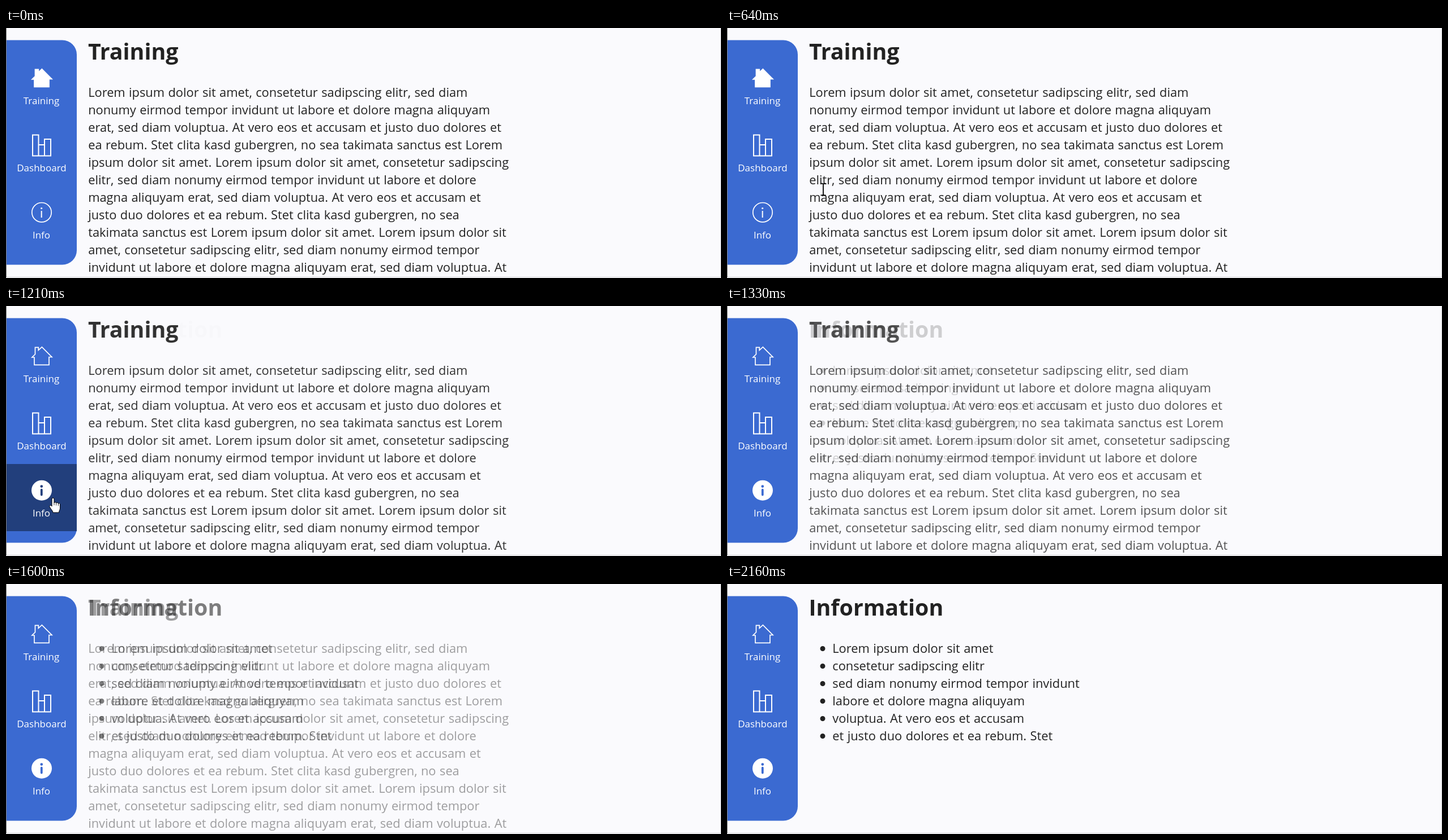
An HTML page for the animation above (2420 ms loop, 1263 by 443 pixels).

```html
<!DOCTYPE html>
<html lang="en">
<head>
<meta charset="utf-8">
<title>Sidebar navigation</title>
<style>
  html, body { margin: 0; width: 100%; height: 100%; overflow: hidden; background: #fafafd; }
  svg { display: block; width: 100%; height: 100%; }
  text { font-family: "Open Sans", "Noto Sans", sans-serif; font-kerning: normal; }
  .page { fill: #222; font-size: 21.8px; word-spacing: .8px; }
  .page .title { font-size: 39.3px; font-weight: 700; }
  .label { fill: #fff; font-size: 17px; font-weight: 500; text-anchor: middle; }
  .line { fill: none; stroke: #fff; stroke-width: 1.7; }

  .anim { animation: 2420ms linear infinite; }
  .hard { animation: 2420ms step-end infinite; }
  .leave { animation-name: leave; }
  .enter { animation-name: enter; }
  .before { animation-name: before; }
  .after { animation-name: after; }
  .home { animation-name: home; }
  .hover { animation-name: hover; }
  .beam { animation-name: beam; }
  .hand { animation-name: hand; }

  @keyframes leave {
    0%, 47.9% { opacity: 1; }
    50% { opacity: .93; }
    61.16% { opacity: .57; }
    74.79% { opacity: .19; }
    89.2%, 100% { opacity: 0; }
  }
  @keyframes enter {
    0%, 49% { opacity: 0; }
    50% { opacity: .01; }
    61.16% { opacity: .44; }
    74.79% { opacity: .82; }
    89.2%, 100% { opacity: 1; }
  }
  @keyframes before { 0% { opacity: 1; } 47.1%, 100% { opacity: 0; } }
  @keyframes after { 0% { opacity: 0; } 47.1%, 100% { opacity: 1; } }
  @keyframes home { 0% { fill: #fff; } 47.1%, 100% { fill: none; } }
  @keyframes hover { 0% { opacity: 0; } 28.9% { opacity: 1; } 52.4%, 100% { opacity: 0; } }
  @keyframes beam {
    0% { transform: translate(-99px, 0); }
    14.85% { transform: translate(899px, 422px); }
    16.1% { transform: translate(760px, 340px); }
    17.3% { transform: translate(590px, 265px); }
    18.55% { transform: translate(430px, 228px); }
    19.8% { transform: translate(330px, 223px); }
    21.05% { transform: translate(270px, 228px); }
    22.3% { transform: translate(230px, 240px); }
    23.5% { transform: translate(205px, 254px); }
    24.75% { transform: translate(185px, 270px); }
    26.4% { transform: translate(170px, 286px); }
    27.65% { transform: translate(146px, 304px); }
    28.9% { transform: translate(-99px, 0); }
    52.4% { transform: translate(185px, 348px); }
    53.7% { transform: translate(455px, 373px); }
    54.9%, 100% { transform: translate(-99px, 0); }
  }
  @keyframes hand {
    0% { transform: translate(-99px, 0); }
    28.9% { transform: translate(110px, 322px); }
    30.1% { transform: translate(90px, 336px); }
    31.35% { transform: translate(81px, 341px); }
    38.4% { transform: translate(83px, 341px); }
    52.4%, 100% { transform: translate(-99px, 0); }
  }
</style>
</head>
<body>
<svg viewBox="0 0 1263 443">
  <g class="page anim leave">
    <text class="title" x="145" y="55.5">Training</text>
    <text y="90.5">
      <tspan x="145.2" dy="31">Lorem ipsum dolor sit amet, consetetur sadipscing elitr, sed diam</tspan>
      <tspan x="145.2" dy="31">nonumy eirmod tempor invidunt ut labore et dolore magna aliquyam</tspan>
      <tspan x="145.2" dy="31">erat, sed diam voluptua. At vero eos et accusam et justo duo dolores et</tspan>
      <tspan x="145.2" dy="31">ea rebum. Stet clita kasd gubergren, no sea takimata sanctus est Lorem</tspan>
      <tspan x="145.2" dy="31">ipsum dolor sit amet. Lorem ipsum dolor sit amet, consetetur sadipscing</tspan>
      <tspan x="145.2" dy="31">elitr, sed diam nonumy eirmod tempor invidunt ut labore et dolore</tspan>
      <tspan x="145.2" dy="31">magna aliquyam erat, sed diam voluptua. At vero eos et accusam et</tspan>
      <tspan x="145.2" dy="31">justo duo dolores et ea rebum. Stet clita kasd gubergren, no sea</tspan>
      <tspan x="145.2" dy="31">takimata sanctus est Lorem ipsum dolor sit amet. Lorem ipsum dolor sit</tspan>
      <tspan x="145.2" dy="31">amet, consetetur sadipscing elitr, sed diam nonumy eirmod tempor</tspan>
      <tspan x="145.2" dy="31">invidunt ut labore et dolore magna aliquyam erat, sed diam voluptua. At</tspan>
    </text>
  </g>

  <g class="page anim enter">
    <text class="title" x="144.5" y="55.5">Information</text>
    <path d="M169 114.5V270" fill="none" stroke="#222" stroke-width="9" stroke-linecap="round" stroke-dasharray="0 31"/>
    <text y="90.5">
      <tspan x="186.3" dy="31">Lorem ipsum dolor sit amet</tspan>
      <tspan x="186.3" dy="31">consetetur sadipscing elitr</tspan>
      <tspan x="186.3" dy="31">sed diam nonumy eirmod tempor invidunt</tspan>
      <tspan x="186.3" dy="31">labore et dolore magna aliquyam</tspan>
      <tspan x="186.3" dy="31">voluptua. At vero eos et accusam</tspan>
      <tspan x="186.3" dy="31">et justo duo dolores et ea rebum. Stet</tspan>
    </text>
  </g>

  <!-- window edges -->
  <path d="M0 441.5H1263M1262.5 0V442" stroke="#d2d2d4"/>
  <path d="M.5 0V442" stroke="#7c7c7c"/>

  <!-- sidebar -->
  <path d="M1 21.5H99.5a25.5 25.5 0 0 1 25.5 25.5V394a25.5 25.5 0 0 1-25.5 25.5H1Z" fill="#3b6ad1"/>
  <path class="hard hover" d="M1 280H125V399H1Z" fill="#223f7c"/>

  <g class="line">
    <path class="hard home" d="M50 104.4V91H46L51.5 85.5V73.3H57.3V78.3L63.4 72.6 81 90.5H76V104.4Z"/>
    <path stroke-width="2" d="M47 189.5H57.5V226.5H47ZM57.5 207H68V226.5H57.5M68 226.5V197H79V226.5Z"/>
    <g class="hard before">
      <circle cx="63" cy="326.7" r="17.2"/>
      <path d="M62.7 324V336" stroke-width="2"/>
      <circle cx="62.7" cy="319.5" r="1.6" fill="#fff" stroke="none"/>
    </g>
  </g>
  <path class="hard after" fill="#fff" fill-rule="evenodd"
    d="M45 326.7a18 18 0 0 1 36 0a18 18 0 0 1-36 0ZM60.4 319.6a2.4 2.4 0 0 1 4.8 0a2.4 2.4 0 0 1-4.8 0ZM60.9 325.6a1.9 1.9 0 0 1 3.8 0V334.6a1.9 1.9 0 0 1-3.8 0Z"/>

  <text class="label" x="62.5" y="135">Training</text>
  <text class="label" x="63" y="254">Dashboard</text>
  <text class="label" x="62.5" y="373">Info</text>

  <!-- cursors -->
  <g class="hard beam">
    <path d="M-4.5 -10.3H-1.5L0 -9.5 1.5 -10.3H4.5M0 -9.5V9.5M-4.5 10.3H-1.5L0 9.5 1.5 10.3H4.5" fill="none" stroke="#000" stroke-width="1.8"/>
  </g>
  <g class="hard hand" stroke="#000" stroke-linejoin="round">
    <path fill="#fff" d="M-2 14V1a2 2 0 0 1 4 0V8a1.9 1.9 0 0 1 3.7 .7a1.9 1.9 0 0 1 3.7 .8a1.8 1.8 0 0 1 3.2 1.5V17C12.6 20 10.8 21 10.5 25H0C-.3 22-3 20-5.6 15.5C-7.2 12.5-4 10.5-2 14Z"/>
    <path fill="none" stroke-width=".8" d="M2 8V12M5.7 8.7V12.5M9.4 9.5V13"/>
  </g>
</svg>
</body>
</html>
```
